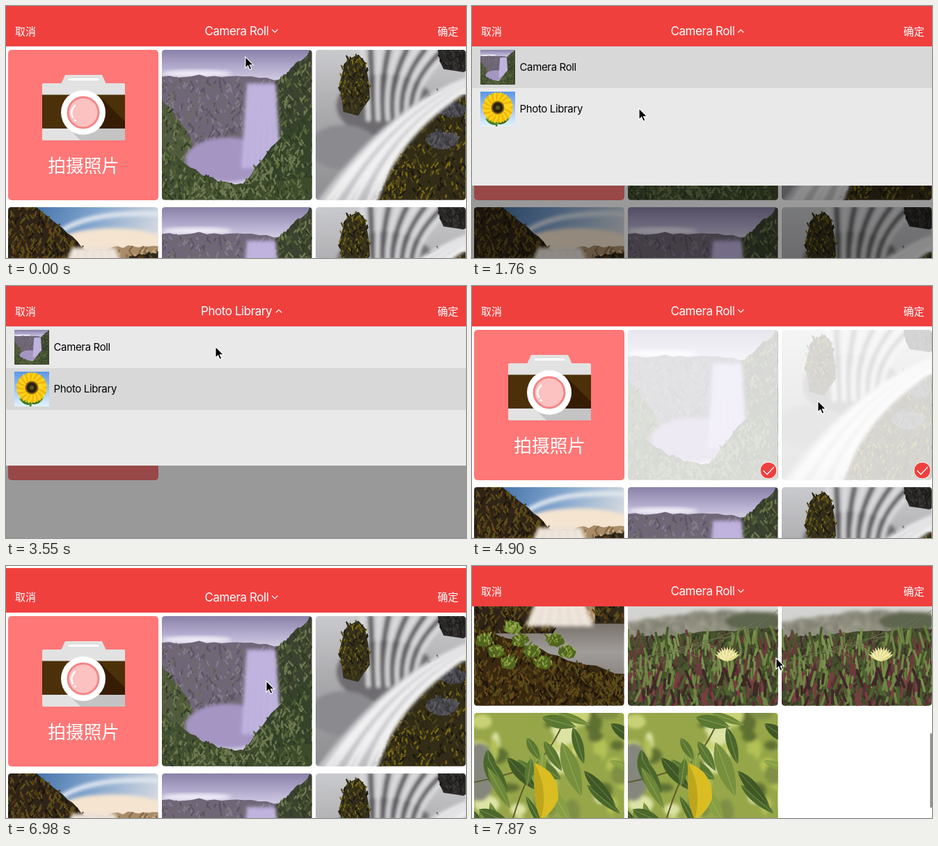
These frames come from a looping animation (661 by 362 pixels, 8 s). An HTML page:

```html
<!DOCTYPE html>
<html lang="zh">
<head>
<meta charset="utf-8">
<title>Photo picker</title>
<style>
html, body { margin: 0; width: 100%; height: 100%; overflow: hidden; background: #fff; }
svg#stage { display: block; width: 661px; height: 362px; }
text { font-family: Inter, "Noto Sans CJK SC", "Noto Sans CJK", sans-serif; }
.cjk { font-family: "Noto Sans CJK SC", "Noto Sans CJK", sans-serif; fill: #fff; }
.title { font-size: 17px; letter-spacing: -.43px; fill: #fff; }
.label { font-size: 15px; letter-spacing: -.35px; }
</style>
</head>
<body>
<svg id="stage" viewBox="0 0 661 362"></svg>
<script>
const LOOP = 8000, STEP = 148.5, LAST = 53;
const RED = '#f0403e', TILE = 216, PITCH = 226, TOP = 63;

const clamp = u => Math.max(0, Math.min(1, u));
const smooth = u => (u = clamp(u)) * u * (3 - 2 * u);
const out = (u, power) => 1 - (1 - clamp(u)) ** power;
const loop = (n, f) => Array.from({ length: n }, (_, i) => f(i));

function random(seed) {
  let s = seed * 7919 + 1;
  return () => (s = s * 16807 % 2147483647) / 2147483647;
}

// ---- drawing helpers ----
const rect = (x, y, w, h, fill, more = '') =>
  `<rect x="${x}" y="${y}" width="${w}" height="${h}" fill="${fill}" ${more}/>`;
const oval = (x, y, rx, ry, fill, more = '') =>
  `<ellipse cx="${x}" cy="${y}" rx="${rx}" ry="${ry}" fill="${fill}" ${more}/>`;
const disc = (x, y, r, fill) => oval(x, y, r, r, fill);
const poly = (pts, fill) => `<polygon points="${pts.join(' ')}" fill="${fill}"/>`;
const line = (d, color, width, more = '') =>
  `<path d="${d}" fill="none" stroke="${color}" stroke-width="${width}" stroke-linecap="round" ${more}/>`;
const soft = s => `<g filter="url(#soft)">${s}</g>`;
const fade = (id, colors, dir = 'x2="0" y2="1"') => `<linearGradient id="${id}" ${dir}>` +
  colors.map((c, i) => `<stop offset="${i / (colors.length - 1)}" stop-color="${c}"/>`).join('') + '</linearGradient>';
const symbol = (id, art) =>
  `<symbol id="${id}" viewBox="0 0 216 216"><g clip-path="url(#round)">${art}</g></symbol>`;
const use = (id, x, y, size) => `<use href="#${id}" x="${x}" y="${y}" width="${size}" height="${size}"/>`;

// Many short strokes, one path per tint; place(r) picks each foot
function strokes(n, place, length, lean, width, tints, seed) {
  const r = random(seed), d = tints.map(() => '');
  for (let i = 0; i < n; i++) {
    const [x, y] = place(r), h = length * (.4 + r());
    d[i % d.length] += `M${x.toFixed(1)} ${y.toFixed(1)}l${((r() * 2 - 1) * lean * h).toFixed(1)} ${(-h).toFixed(1)}`;
  }
  return d.map((p, i) => line(p, tints[i], width)).join('');
}

// Textured ground under a rough, bowed edge
function land(x0, y0, x1, y1, bow, floor, fill, tints, seed) {
  const r = random(seed), edge = u => y0 + (y1 - y0) * u + bow * Math.sin(Math.PI * u);
  const pts = loop(17, i => [x0 + (x1 - x0) * i / 16, edge(i / 16) + (r() - .5) * 5]);
  const spot = r => {
    const u = r(), y = edge(u) + 5;
    return [x0 + (x1 - x0) * u, y + r() * Math.max(0, floor - y)];
  };
  return poly([...pts, [x1, floor], [x0, floor]], fill) +
    strokes((x1 - x0) * (floor - Math.min(y0, y1)) / 40, spot, 5, 1, 2.4, tints, seed);
}

// Textured clump: a plant or a boulder
function clump(x, y, rx, ry, fill, tints, seed) {
  const r = random(seed), ring = (a, k) => [x + Math.cos(a) * rx * k, y + Math.sin(a) * ry * k];
  return poly(loop(14, i => ring(i * Math.PI / 7, .8 + r() * .3)), fill) +
    strokes(rx * ry / 7, r => ring(r() * 6.28, Math.sqrt(r()) * .9), 4, 1, 2, tints, seed);
}

// Falling water with streaks that fan out
function veil(x, y, w, h, spread, fill, streak) {
  return soft(poly([[x, y], [x + w, y], [x + w + spread, y + h], [x - spread, y + h]], fill) +
    loop(6, i => {
      const u = (i + .5) / 6;
      return line(`M${x + w * u} ${y + 4}L${x - spread + (w + 2 * spread) * u} ${y + h}`, streak, 2, 'opacity=".6"');
    }).join(''));
}

const leaf = (x, y, len, w, turn, fill) =>
  `<g transform="translate(${x} ${y}) rotate(${turn})"><path d="M0 0Q${len * .4} ${-w} ${len} 0Q${len * .4} ${w} 0 0" fill="${fill}"/>` +
  line(`M0 0H${len}`, '#c9d584', .7, 'opacity=".5"') + '</g>';

// ---- photos ----
const GREY = ['#847b8c', '#5c5463', '#6f6a6a'], MOSS = ['#5d6b3c', '#2f3a22', '#4b5a34', '#6f7a52'];
const ROCK = ['#7a6a14', '#1d180e', '#4d4418', '#2c2717'], EARTH = ['#6b4a18', '#1c140a', '#4f3a14', '#574f1a'];
const FERN = ['#9bb04a', '#4c6420', '#7a9234'];

const violetFalls = () => rect(0, 0, 216, 216, '#d6d0e6') + rect(0, 0, 216, 50, 'url(#violet)') +
  soft(oval(50, 34, 50, 5, '#eeeaf6')) +
  land(0, 40, 172, 44, -4, 170, '#6f6778', GREY, 3) +
  land(0, 72, 68, 185, -12, 200, '#525a40', MOSS, 4) +
  land(162, 48, 216, 0, 0, 150, '#3b4230', MOSS, 5) +
  soft(oval(95, 158, 62, 32, '#a495c2')) + veil(122, 48, 42, 122, 8, '#baaddb', '#dcd3f0') +
  land(112, 200, 216, 84, -8, 216, '#34432a', MOSS, 8) +
  land(0, 140, 130, 196, 14, 216, '#404d30', MOSS, 11) + land(120, 192, 216, 182, 0, 216, '#3d4a2c', MOSS, 12);

const rockFalls = () => rect(0, 0, 216, 216, 'url(#mist)') +
  soft(oval(100, 80, 70, 45, '#6e6c6f') + oval(40, 140, 50, 32, '#8b8a8e') +
    loop(11, i => line(`M${66 + i * 13} 0Q${75 + i * 6} 50 ${76 + i * 7} 100`, i % 2 ? '#59575a' : '#dededf', 6)).join('')) +
  clump(56, 50, 24, 46, '#35311c', ROCK, 4) + clump(205, 8, 32, 24, '#2a2826', ['#3a3835', '#1c1b1a'], 6) +
  land(90, 216, 216, 66, -66, 216, '#332c16', ROCK, 9) +
  clump(182, 130, 26, 14, '#4b4a4f', ['#5d5c62', '#3a393d'], 2) + clump(196, 86, 24, 12, '#45444a', ['#57565c', '#343338'], 3) +
  soft(loop(9, i => line(`M216 ${42 + i * 2}Q${104 + i} ${85 + i * 5} ${5 + i * 10} 220`, i % 3 ? '#f1f1f2' : '#c5c5c9', 7)).join(''));

const sunnyFalls = () => rect(0, 0, 216, 216, 'url(#dawn)') +
  soft(oval(150, 52, 80, 22, '#f4e4d0') + line('M75 35Q120 5 216 10', '#dfe6ee', 7)) +
  land(100, 64, 216, 56, -2, 110, '#a88c68', ['#c5a983', '#856a48'], 7) +
  rect(0, 96, 216, 85, 'url(#river)') +
  land(0, -25, 114, 64, -8, 112, '#2f2417', EARTH, 12) +
  veil(92, 58, 62, 44, 18, '#eae0d5', '#fff') +
  land(174, 72, 216, 64, 0, 98, '#30281a', EARTH, 2) +
  land(0, 100, 216, 172, 4, 216, '#38280f', EARTH, 9) +
  loop(8, i => clump(15 + i * 17, 122 + i % 3 * 16, 13, 10, '#53651f', FERN, 20 + i)).join('') +
  clump(56, 104, 13, 10, '#7d9438', FERN, 31);

const meadow = () => rect(0, 0, 216, 216, 'url(#haze)') +
  soft(land(0, 96, 216, 82, -8, 130, '#8d8c7d', ['#aaa698', '#73756a'], 7) + oval(185, 95, 45, 14, '#5f6650')) +
  land(0, 118, 216, 104, 0, 216, '#454b2d', ['#56633a', '#43282c', '#333d22'], 4) +
  strokes(260, r => [r() * 216, 122 + r() * 75], 17, .35, 3.4, ['#66803c', '#7c9250', '#47592c', '#5d4a34', '#6b3a3c', '#728748'], 14) +
  strokes(150, r => [r() * 216, 175 + r() * 50], 17, .5, 3.8, ['#5f2b35', '#4e6330', '#7b3c42', '#6f8544', '#3b2a26'], 15) +
  loop(6, i => line(`M${i * 40 - 30} ${185 - i * 15}Q${40 + i * 25} 120 ${100 + i * 24} ${145 - i * 14}`, '#6d7350', 1)).join('') +
  line('M144 153L147 174', '#799040', 3) +
  loop(11, i => leaf(143, 152, 21, 5, -150 + i * 12, i % 2 ? '#f5f0bd' : '#e6dc8c')).join('');

function foliage() {
  const r = random(21), glow = ['#c9d277', '#7f8f45', '#b3c155', '#5f7130', '#dde3a4', '#94a64a'];
  const greens = ['#4a672c', '#6d8838', '#3f5826', '#88a044', '#5a7832'];
  return rect(0, 0, 216, 216, '#96a648') +
    soft(loop(60, i => oval(r() * 216, r() * 216, 6 + r() * 13, 6 + r() * 13, glow[i % 6])).join('') + oval(8, 85, 22, 42, '#85877c')) +
    line('M88 74Q110 55 128 15L132 0M40 216Q60 120 88 74M0 100Q50 90 88 74', '#5d5a2e', 2) +
    loop(30, i => leaf(r() * 216 - 10, r() * 200 - 20, 35 + r() * 35, 9 + r() * 10, 15 + r() * 85, greens[i % 5])).join('') +
    leaf(126, 42, 84, 24, 70, '#76903e') +
    '<path d="M87 72Q124 86 121 124Q112 146 96 153Q84 130 87 72" fill="#d9bd22"/>' +
    '<path d="M87 72Q108 110 96 153Q84 130 87 72" fill="#bda51c"/>';
}

const sunflower = () => rect(0, 0, 50, 50, 'url(#sky)') + line('M25 30Q25 42 23 50', '#3f7a1e', 2.5) +
  leaf(24, 46, 20, 8, -25, '#2f6b1c') + leaf(25, 47, 20, 8, 205, '#3c7d22') +
  loop(32, i => oval(39, 23, 8.5, 3, i % 2 ? '#ffd51c' : '#f3b808', `transform="rotate(${i * 11.25} 25 23)"`)).join('') +
  disc(25, 23, 9.5, '#8a6410') + disc(25, 23, 7.5, '#2b2110') + disc(25, 23, 3, '#5b5522');

// ---- interface ----
const camera = rect(3, TOP, TILE, TILE, '#ff7777', 'rx="5"') +
  poly([[85, 99], [138, 99], [144, 112], [79, 112]], '#e2e2e2') + line('M91 105.5H132', '#fff', 3) +
  rect(52, 111, 119, 82, '#e2e2e2', 'rx="2"') + rect(52, 127.5, 119, 48.5, '#4b3009') +
  poly([[134, 129], [171, 166], [171, 176], [130, 176]], '#351c02') +
  poly([[90, 176], [171, 176], [171, 193], [107, 193]], '#c4c4c4') +
  disc(111, 153, 32, '#fff') + disc(111, 153, 23.5, '#f48585') + disc(111, 153, 20.5, '#fcc1c1') +
  line('M99 143Q91 151 96 160M99 164l.5.5', '#fff', 2.6) +
  '<text class="cjk" x="60.3" y="239" font-size="25.7" font-weight="350">拍摄照片</text>';

const slot = i => [3 + 221 * (i % 3), TOP + PITCH * Math.floor(i / 3)];
const trio = ['violet-falls', 'rock-falls', 'sunny-falls'];
const tiles = [...trio, ...trio, 'meadow', 'meadow', 'foliage', 'foliage']
  .map((id, i) => use(id, ...slot(i + 1), 215.7)).join('');

function mark(i) {
  const [x, y] = slot(i);
  return `<g id="mark${i}">${rect(x, y, 215.7, TILE, '#fff', 'opacity=".8"')}` +
    `<circle cx="${x + 202}" cy="265" r="12" fill="${RED}" stroke="#fff"/>` +
    line(`M${x + 195} 265.5l5 5 9.5-10`, '#fff', 1.3) + '</g>';
}

const stage = document.getElementById('stage');
stage.innerHTML = '<defs><clipPath id="round"><rect width="216" height="216" rx="4.5"/></clipPath>' +
  '<filter id="soft"><feGaussianBlur stdDeviation="2.5"/></filter>' +
  fade('violet', ['#8a81a8', '#b3abcd', '#dcd7ea']) +
  fade('mist', ['#c9cacd', '#a5a4a7', '#8e8d90']) +
  fade('dawn', ['#2d5f9c', '#7ea2cc', '#e6e4e4'], 'x2="1" y2=".4"') +
  fade('river', ['#77706a', '#a19d9a', '#85807c']) +
  fade('haze', ['#dfe3e6', '#cfcfcb', '#a9a69a']) +
  fade('sky', ['#5b97e4', '#e2f3fc']) +
  symbol('violet-falls', violetFalls()) + symbol('rock-falls', rockFalls()) + symbol('sunny-falls', sunnyFalls()) +
  symbol('meadow', meadow()) + symbol('foliage', foliage()) + '</defs>' +
  rect(0, 0, 661, 362, '#fff') + rect(281, 151, 100, 60, '#0f0') +
  '<text class="cjk" x="331" y="188" font-size="17.6" text-anchor="middle">选择</text>' +
  '<g id="sheet">' + rect(0, -6, 661, 375, '#fff') +
  `<g id="grid">${camera}<g id="tiles">${tiles}</g>${mark(1)}${mark(2)}</g>` +
  rect(658.3, 58, 2.7, 107, '#8c8c8c', 'id="bar" rx="1.3"') +
  rect(0, 58, 661, 311, '#000', 'id="dim"') +
  '<g id="menu">' + rect(0, 58, 661, 200, '#e9e9e9') + rect(0, 58, 661, 60, '#d8d8d8', 'id="row"') +
  use('violet-falls', 12, 63, 50) + `<svg x="12" y="123" width="50" height="50" viewBox="0 0 50 50">${sunflower()}</svg>` +
  '<text class="label" x="68.5" y="93.4">Camera Roll</text><text class="label" x="68.5" y="153.4">Photo Library</text></g>' +
  rect(0, -6, 661, 64, RED) +
  '<text class="cjk" x="13" y="41.5" font-size="15">取消</text><text class="cjk" x="620" y="41.5" font-size="15">确定</text>' +
  '<text id="title" class="title" y="42"></text>' + line('M-3.8-2L0 2L3.8-2', '#fff', 1.1, 'id="chevron"') + '</g>' +
  '<path id="cursor" d="M0 0V16.2L3.7 12.7L6.2 18.5L8.9 17.3L6.4 11.7H11.4Z" stroke="#fff" stroke-width="1.1"/>';

const el = {};
stage.querySelectorAll('[id]').forEach(n => el[n.id] = n);
const move = (n, x, y, more = '') => n.setAttribute('transform', `translate(${x} ${y}) ${more}`);
const show = (n, on) => n.setAttribute('visibility', on ? 'visible' : 'hidden');

const home = [344, 73];
const trips = [ // leave, arrive, x, y
  [0, 3, 344, 31], [8, 12, 240, 147], [15, 19, 325, 36], [22, 24, 301, 87], [27, 30, 312, 160],
  [30, 33, 497, 165], [33, 38, 623, 36], [41, 44, 374, 165], [49, 53, 437, 132]];
const menus = [[6, 13], [19, 24]]; // opened, closed
const picks = [30, 33], closeAt = 39, reopenAt = 44, scrollAt = 48;

const pointer = k => trips.reduce(([x, y], [a, b, tx, ty]) => {
  const u = out((k - a) / (b - a), 3);
  return [x + (tx - x) * u, y + (ty - y) * u];
}, home);
const opening = k => menus.reduce((sum, [a, b]) => sum + smooth((k - a) / 3) - smooth((k - b) / 3), 0);
const lowering = k => 378 * (out((k - closeAt) / 3, 2) - out((k - reopenAt) / 4, 2.7));
const scrolling = k => 530 * smooth((k - scrollAt) / (LAST - scrollAt));

function draw(k) {
  const open = opening(k), scroll = scrolling(k);
  const library = k > menus[0][1] && k <= menus[1][1];
  const unfolded = menus.some(([a, b]) => k > a && k <= b);
  move(el.sheet, 0, lowering(k));
  move(el.grid, 0, -scroll);
  move(el.bar, 0, 204 * scroll / 593);
  show(el.bar, scroll > 0);
  show(el.tiles, !library);
  picks.forEach((tick, i) => show(el['mark' + (i + 1)], k >= tick && k < reopenAt));
  el.dim.setAttribute('opacity', open * .4);
  move(el.menu, 0, -200 * (1 - open));
  show(el.menu, open > 0);
  move(el.row, 0, library ? 60 : 0);
  el.title.textContent = library ? 'Photo Library' : 'Camera Roll';
  el.title.setAttribute('x', library ? 280 : 285.5);
  move(el.chevron, library ? 392 : 386.3, 36, unfolded ? 'scale(1 -1)' : '');
  move(el.cursor, ...pointer(k));
}

let shown = -1;
function frame() {
  const k = Math.min(LAST, Math.floor((performance.now() % LOOP + 24) / STEP));
  if (k !== shown) draw(shown = k);
  requestAnimationFrame(frame);
}
frame();
</script>
</body>
</html>
```
